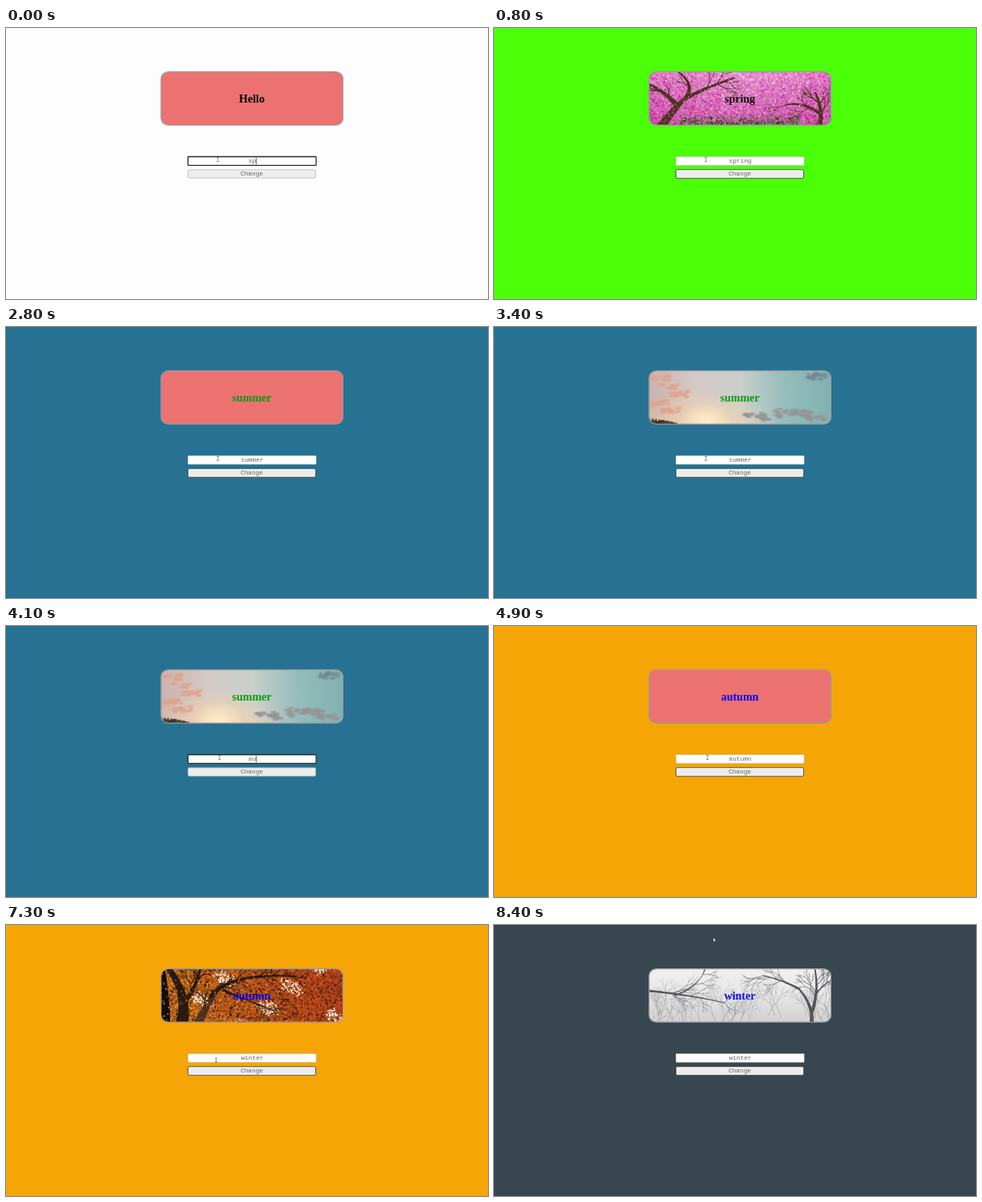
Animation of 600 by 338 pixels, one loop 8.5 s. Source, as an HTML page with a canvas:

```html
<!DOCTYPE html>
<html lang="en">
<head>
<meta charset="utf-8">
<title>Season changer</title>
<style>
  html, body { margin: 0; width: 600px; height: 338px; overflow: hidden; }
  #stage { position: relative; width: 600px; height: 338px; overflow: hidden; }
  #photo { position: absolute; left: 193px; top: 55px; border-radius: 9px; }
  svg { position: absolute; left: 0; top: 0; }
  text { text-anchor: middle; }
  #word { font: bold 14px "Liberation Serif", "Times New Roman", serif; }
  .mono { font: 7.8px "Liberation Mono", "Courier New", monospace; fill: #666; }
</style>
</head>
<body>
<div id="stage">
  <canvas id="photo" width="227" height="66"></canvas>
  <svg width="600" height="338" viewBox="0 0 600 338">
    <rect x="193" y="54.6" width="226.4" height="66.6" rx="9" fill="none" stroke="#9c9a9a" stroke-width="1.2"/>
    <text id="word" x="306" y="93"></text>
    <rect id="field" x="226.5" y="160.5" width="159.6" height="10.8" rx="0.8" fill="#fff"/>
    <text id="typed" class="mono" x="306.5" y="168.2"></text>
    <path id="caret" stroke="#333" stroke-width="0.7"/>
    <rect id="button" x="226.6" y="176.8" width="158.8" height="10.4" rx="1.4" fill="#ededed"/>
    <rect id="glow" x="227.5" y="177.7" width="157" height="8.6" rx="0.6" fill="none" stroke="#fff" stroke-width="0.7"/>
    <text class="mono" x="306" y="184.3">Change</text>
    <path id="beam" d="M-1.5-2.6H1.5M0-2.6V2.6M-1.5 2.6H1.5" fill="none" stroke="#666" stroke-width="0.7"/>
    <path id="arrow" d="M0 0V4.6L1.1 3.7 1.9 5.2 2.6 4.8 1.9 3.4H3.2Z" fill="#fff" stroke="#222" stroke-width="0.3"/>
  </svg>
</div>
<script>
const LOOP = 8500, KEY = 100, W = 227, H = 66;
const $ = id => document.getElementById(id);

let seed = 1;
const rnd = () => (seed = (seed * 16807) % 2147483647) / 2147483647;
const span = (a, b) => a + (b - a) * rnd();
const hsl = (h, s, l) => `hsl(${h} ${s}% ${l}%)`;

// Scenes are painted in card coordinates, W by H.
function scene(paint) {
  const cv = document.createElement('canvas');
  cv.width = W; cv.height = H;
  const c = cv.getContext('2d');
  c.lineCap = 'round';
  seed = 41;
  paint(c);
  return cv;
}

function fade(c, x, y, ...colors) {
  const g = c.createLinearGradient(0, 0, x, y);
  colors.forEach((col, i) => g.addColorStop(i / (colors.length - 1), col));
  c.fillStyle = g;
  c.fillRect(0, 0, W, H);
}

function glow(c, x, y, r, color, squash) {
  c.save();
  c.translate(x, y);
  c.scale(1, squash);
  const g = c.createRadialGradient(0, 0, 0, 0, 0, r);
  g.addColorStop(0, `rgb(${color} / 1)`);
  g.addColorStop(1, `rgb(${color} / 0)`);
  c.fillStyle = g;
  c.fillRect(-r, -r, 2 * r, 2 * r);
  c.restore();
}

// Scatters leaves; tint gives each a colour from its place (0..1 each way).
function leaves(c, n, size, tint) {
  for (let i = 0; i < n; i++) {
    const u = rnd(), v = rnd();
    c.fillStyle = tint(u, v);
    c.beginPath();
    c.ellipse(u * W, v * H, span(0.5, size), span(0.4, size * 0.7), span(0, 3), 0, 7);
    c.fill();
  }
}

function twig(c, x, y, angle, len, w) {
  if (len < 3) return;
  const x2 = x + len * Math.cos(angle), y2 = y + len * Math.sin(angle);
  c.lineWidth = w;
  c.beginPath();
  c.moveTo(x, y);
  c.lineTo(x2, y2);
  c.stroke();
  for (const side of [-1, 1])
    twig(c, x2, y2, angle + side * span(0.1, 0.6), len * span(0.6, 0.85), w * 0.75);
}

// Tapered curve from a to b, bent towards m, with twigs sprouting on its outer part.
function limb(c, color, w, a, m, b, sprouts = 0) {
  const N = 14;
  const on = (k, t) => (1 - t) ** 2 * a[k] + 2 * t * (1 - t) * m[k] + t * t * b[k];
  c.strokeStyle = color;
  for (let i = 0; i < N; i++) {
    const t = i / N, t2 = (i + 1) / N;
    c.lineWidth = w * (1 - 0.65 * t);
    c.beginPath();
    c.moveTo(on(0, t), on(1, t));
    c.lineTo(on(0, t2), on(1, t2));
    c.stroke();
  }
  for (let i = 0; i < sprouts; i++) {
    const t = span(0.3, 1), side = i % 2 ? 1 : -1;
    const angle = Math.atan2(b[1] - a[1], b[0] - a[0]) + side * span(0.3, 0.9);
    twig(c, on(0, t), on(1, t), angle, span(7, 11), Math.max(0.6, w * 0.22));
  }
}

function paintSpring(c) {
  const tint = (u, v) => {
    const off = Math.abs(u - 0.5);
    if (off < 0.33 && v > span(0.78, 0.95)) return hsl(span(60, 110), 30, span(12, 42));
    return hsl(span(308, 324), 66, 79 - 24 * off - 16 * v + span(-19, 17));
  };
  const bark = '#4d331f';
  fade(c, 0, H, '#dd86c5', '#bf62a2');
  leaves(c, 4200, 1.7, tint);
  limb(c, bark, 11, [14, 70], [30, 46], [46, 32]);
  limb(c, bark, 6, [35, 42], [20, 24], [-3, 14], 3);
  limb(c, bark, 5, [44, 34], [60, 16], [34, -2], 2);
  limb(c, bark, 5, [44, 34], [68, 20], [107, 7], 4);
  limb(c, bark, 6, [212, 68], [217, 46], [207, 26], 4);
  limb(c, bark, 4, [213, 52], [192, 36], [170, 41], 3);
  leaves(c, 700, 1.2, tint);
}

function paintSummer(c) {
  fade(c, W, -10, '#cbb3ad', '#d5cac6', '#c9cfcc', '#93bcba', '#7fb1b0');
  glow(c, 70, 69, 85, '250 212 170', 0.55);
  glow(c, 71, 65, 32, '255 240 205', 0.8);
  const cloud = (x, y, r, tone) => {
    for (let i = 0; i < 14; i++)
      glow(c, x + span(-r, r), y + span(-r, r) * 0.3, span(3, 7), tone, 0.55);
  };
  for (let i = 0; i < 5; i++) {
    cloud(14 + 12 * (i % 3), 9 + 10 * i, 11, '222 163 140');
    cloud(132 + 19 * i, 54 + 4 * Math.sin(2 * i), 13, '148 147 150');
  }
  cloud(209, 7, 12, '112 132 140');
  // Treetops in the lower left corner
  for (let x = 0; x < 34; x += 0.5) {
    c.fillStyle = hsl(span(35, 70), 25, span(12, 26));
    c.fillRect(x, H - span(2, 9) * (1 - x / 45), 1.2, 9);
  }
}

function paintAutumn(c) {
  const tint = (u, v) => {
    const gap = Math.sin(15 * u + 5 * v + 1.7) + Math.sin(9 * v - 21 * u + 1);
    if (u > 0.15 && gap > span(0.75, 2)) return hsl(25, 60, span(88, 100));
    if (rnd() < 0.2) return hsl(15, 60, span(8, 20));
    return hsl(31 - 18 * u + span(-6, 6), 80, 47 - 9 * u + span(-15, 15));
  };
  const bark = '#281a12';
  fade(c, W, 0, '#a85f18', '#a8481c');
  leaves(c, 4200, 1.8, tint);
  limb(c, '#120d0b', 18, [2, 68], [5, 36], [0, -8]);
  limb(c, bark, 15, [25, 72], [36, 32], [7, -4], 3);
  limb(c, '#4a3020', 11, [46, 70], [56, 42], [76, 19], 2);
  limb(c, bark, 6, [28, 42], [44, 24], [49, -2], 3);
  limb(c, bark, 5, [62, 34], [86, 4], [168, 9], 6);
  limb(c, bark, 3, [72, 24], [105, 38], [140, 52], 4);
  leaves(c, 600, 1.3, tint);
}

function paintWinter(c) {
  const bark = '#555558';
  fade(c, 0, H, '#f0f0f1', '#e7e7e8', '#d0d0d1');
  for (let i = 0; i < 38; i++) {
    c.strokeStyle = hsl(240, 1, span(55, 78));
    twig(c, span(0, W), span(57, 73), span(-2.1, -1), span(9, 15), 0.65);
  }
  limb(c, bark, 2.6, [-3, 27], [45, 31], [94, 42], 8);
  limb(c, bark, 1.6, [32, 33], [62, 22], [70, 0], 4);
  limb(c, bark, 5, [202, 69], [206, 48], [187, 25]);
  limb(c, bark, 2.6, [187, 25], [168, 14], [142, 8], 7);
  limb(c, bark, 4, [203, 53], [212, 26], [206, -2], 4);
  limb(c, bark, 2, [206, 34], [215, 20], [229, 12], 4);
}

const photos = {
  spring: scene(paintSpring),
  summer: scene(paintSummer),
  autumn: scene(paintAutumn),
  winter: scene(paintWinter)
};

// Each season is typed from `start`, then applied at `change`.
const seasons = [
  { word: 'spring', bg: '#4aff08', ink: '#111', start: -100, change: 600, x: 263.8, y: 164 },
  { word: 'summer', bg: '#277293', ink: '#0c9a12', start: 1900, change: 2800, x: 263.8, y: 164 },
  { word: 'autumn', bg: '#f5a506', ink: '#0808f0', start: 4000, change: 4900, x: 265.8, y: 164 },
  { word: 'winter', bg: '#37464f', ink: '#1410e0', start: 6400, change: 7400, x: 261.5, y: 168.5 }
];

const poses = [];
let state = { word: 'Hello', bg: '#fdfdfd', ink: '#000', photo: '', pointer: 'beam' };
const at = (time, change) => poses.push([time, state = { ...state, ...change }]);

for (const { word, bg, ink, start, change, x, y } of seasons) {
  at(start - 4 * KEY, { focus: 'field', x, y });
  at(start - 2 * KEY, { text: '' });
  for (let n = 1; n <= word.length; n++)
    at(start + (n - 1) * KEY, { text: word.slice(0, n) });
  at(change - KEY, { focus: 'button' });
  at(change, { word, bg, ink, photo: '' });
  at(change + 2 * KEY, { photo: word });
}
at(8300, { pointer: 'arrow', x: 268, y: 136 });
at(8400, { x: 273, y: 15.8 });

const ctx = $('photo').getContext('2d');
const set = (id, attrs) => {
  for (const k in attrs) $(id).setAttribute(k, attrs[k]);
};

function show(s) {
  const typing = s.focus === 'field';
  $('stage').style.background = s.bg;
  ctx.fillStyle = '#ec7272';
  ctx.fillRect(0, 0, W, H);
  if (s.photo) ctx.drawImage(photos[s.photo], 0, 0);
  $('word').textContent = s.word;
  set('word', { fill: s.ink });
  $('typed').textContent = s.text;
  const end = 306.8 + s.text.length * 2.34;
  set('caret', { d: `M${end} 161.8V170.2`, opacity: typing ? 1 : 0 });
  set('field', { stroke: typing ? '#282828' : '#b5b5b5', 'stroke-width': typing ? 1.3 : 0.5 });
  set('button', { stroke: typing ? '#b4b4b4' : '#484848', 'stroke-width': typing ? 0.7 : 1 });
  set('glow', { opacity: typing ? 0 : 0.9 });
  for (const id of ['beam', 'arrow'])
    set(id, { transform: `translate(${s.x} ${s.y})`, opacity: id === s.pointer ? 1 : 0 });
}

let shown;
function tick() {
  const t = performance.now() % LOOP;
  const pose = poses.filter(p => p[0] <= t).pop()[1];
  if (pose !== shown) show(shown = pose);
  requestAnimationFrame(tick);
}
tick();
</script>
</body>
</html>
```
